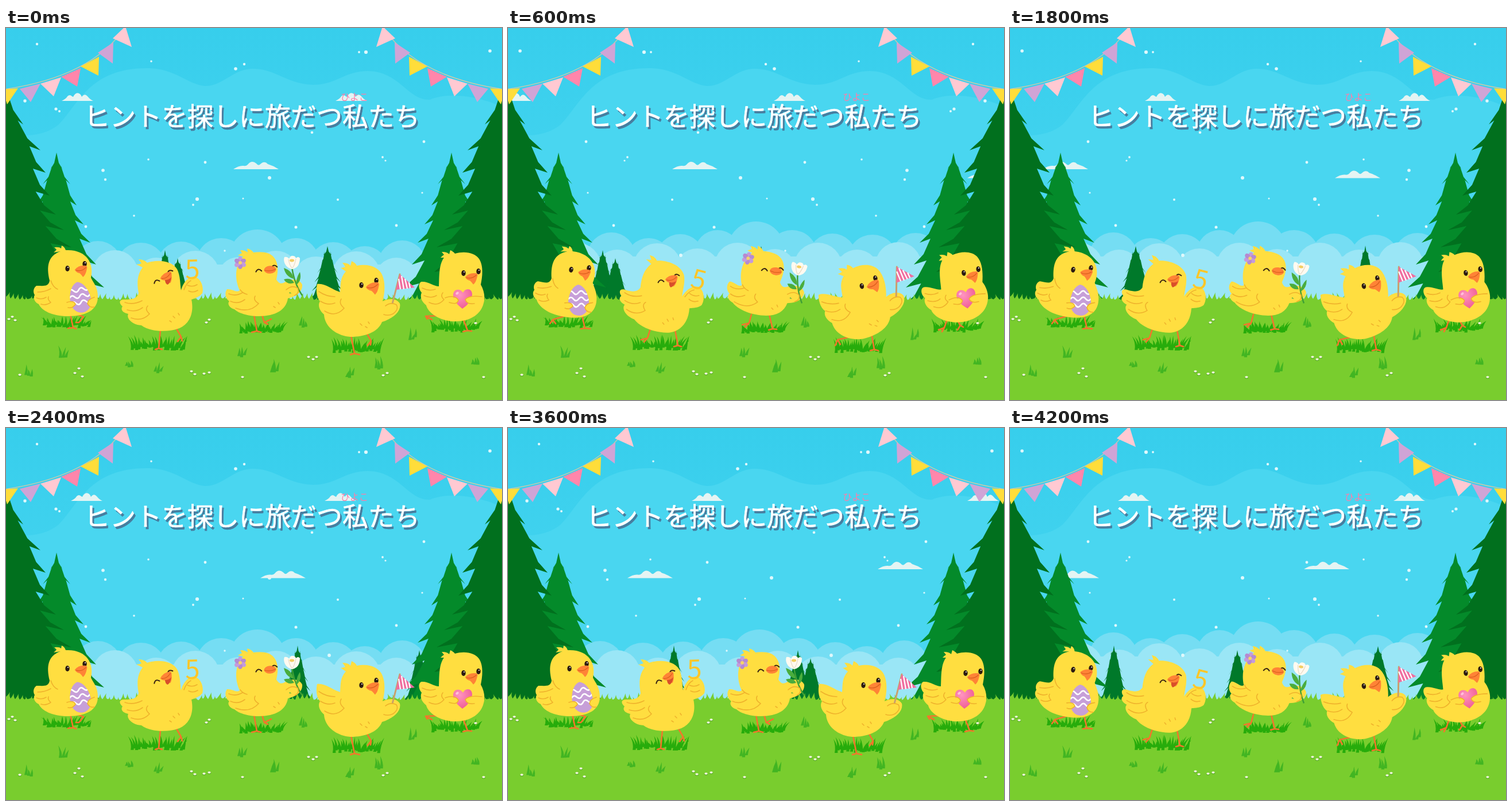
Animation, 864 px wide and 648 px high, one loop 4800 ms. Source, as an HTML page:

```html
<!DOCTYPE html>
<html lang="ja">
<head>
<meta charset="utf-8">
<title>ヒントを探しに旅だつ私たち</title>
<style>
html, body { margin: 0; width: 100%; height: 100%; overflow: hidden; background: #45d4ef; }
svg { display: block; width: 100vw; height: 100vh; }
text { font-family: "Noto Sans CJK JP", "Noto Sans CJK", sans-serif; }
.line { fill: none; stroke: #efb22c; stroke-width: 1.6; stroke-linecap: round; stroke-linejoin: round; }
.leg { fill: none; stroke: #f4752b; stroke-width: 2.6; stroke-linecap: round; stroke-linejoin: round; }
.smile { fill: none; stroke: #3a2412; stroke-width: 2; stroke-linecap: round; }
</style>
</head>
<body>
<svg id="stage" viewBox="0 0 864 648" preserveAspectRatio="none"></svg>
<script>
const STEP = 600, STEPS = 8;
const stage = document.getElementById('stage');

let seed = 7;
const rand = () => (seed = (seed * 16807) % 2147483647) / 2147483647;
const path = (d, fill, more = '') => `<path d="${d}" fill="${fill}" ${more}/>`;
const stroke = (d, cls) => `<path d="${d}" class="${cls}"/>`;
const oval = (x, y, rx, ry, fill, rot = 0) =>
  `<ellipse cx="${x}" cy="${y}" rx="${rx}" ry="${ry}" fill="${fill}" transform="rotate(${rot} ${x} ${y})"/>`;
const dot = (x, y, r, fill) => oval(x, y, r, r, fill);
const mirrored = s => s + `<g transform="matrix(-1 0 0 1 864 0)">${s}</g>`;

// Fir silhouette from the reach of each branch tip, [dx, y].
function fir(cx, top, tips, fill) {
  const side = s => {
    const pts = [];
    tips.forEach(([dx, y], i) => {
      const px = i ? tips[i - 1][0] * .68 : 0, py = i ? tips[i - 1][1] - 7 : top;
      const mx = px * .55 + dx * .45, my = py * .4 + y * .6;
      pts.push([cx + s * px, py], [cx + s * (mx - 1), my], [cx + s * dx, y]);
    });
    return pts;
  };
  return path('M' + [...side(1), ...side(-1).reverse()].map(p => p.join()).join('L') + 'Z', fill);
}

function smallFir(x, top, half) {
  const h = 474 - top, tips = [];
  for (let i = 1; i <= 6; i++) tips.push([half * Math.pow(i / 6, .85), top + h * i / 6]);
  return fir(x, top, tips, '#00792a');
}

function tuft(x, y, n, w, h, fill) {
  let d = '';
  for (let i = 0; i < n; i++) {
    const u = n > 1 ? i / (n - 1) * 2 - 1 : 0;
    const bx = x + u * w * .42, tx = x + u * w * .5 + (rand() - .3) * 9;
    const ty = y - h * (.45 + rand() * .55), by = y + (rand() - .5) * h * .3;
    d += `M${bx - 2.4},${by}Q${bx},${(by + ty) / 2} ${tx},${ty}Q${bx + 4},${(by + ty) / 2} ${bx + 3},${by}Z`;
  }
  return path(d, fill);
}

function bumps(list, fill) {
  return list.map(([x, y, r]) => dot(x, y + r, r, fill)).join('') +
    `<rect x="0" y="412" width="864" height="90" fill="${fill}"/>`;
}

function bunting() {
  const pink = '#ffc9d2', mauve = '#d0a4d6', gold = '#ffdd3a', rose = '#ff86ab';
  const flags = [
    ['208,-3 186,18 219,33', pink], ['187,25 160,43 186,62', mauve],
    ['162,50 130,67 161,83', gold], ['130,70 96,85 124,102', rose],
    ['96,86 60,97 83,119', pink], ['60,97 24,106 43,129', mauve], ['21,105 -6,107 2,133', gold]];
  return '<path d="M208,-2Q150,85 -4,107" fill="none" stroke="#d9c9a5" stroke-width="1.2"/>' +
    flags.map(([p, c]) => `<polygon points="${p}" fill="${c}"/>`).join('');
}

function ground() {
  let d = 'M0,648L0,468';
  for (let x = 0; x < 864; x += 8) {
    const top = 460 + rand() * 9, lean = (rand() - .5) * 7;
    d += `Q${x + 3},${top + 6} ${x + 4 + lean},${top}Q${x + 5},${top + 7} ${x + 8},${470 + rand() * 4}`;
  }
  let s = path(d + 'L864,648Z', '#79cd2e');
  for (const [x, y, w, h] of [[105, 523, 92, 20], [264, 562, 106, 25], [444, 533, 84, 22], [610, 566, 92, 25], [782, 530, 92, 23]])
    s += tuft(x, y - 3, 24, w, h, '#27ac0b');
  for (const [x, y] of [[39, 605], [99, 573], [214, 591], [264, 600], [410, 571], [467, 597], [598, 608], [649, 592], [708, 541], [817, 587], [517, 521]])
    s += tuft(x, y, 3, 11, 21, '#42b522');
  for (const [x, y] of [[5, 507], [11, 503], [16, 509], [24, 604], [127, 593], [120, 601], [133, 607], [323, 598], [329, 603], [345, 602], [354, 600], [354, 508], [349, 513], [412, 608], [527, 573], [535, 577], [541, 573], [657, 605], [664, 601], [832, 608], [818, 514]])
    s += oval(x, y + 1, 3.2, 1.8, '#58a72b') + oval(x, y, 2.7, 1.7, '#f3f7df');
  return s;
}

const eye = (x, y) => oval(x, y, 3.7, 5, '#2c1b10') + dot(x + 1, y - 2, 1, '#fff');
const happy = (x, y, rot) => `<g transform="translate(${x} ${y}) rotate(${rot})">${stroke('M-5,2Q0,-5 5,2', 'smile')}</g>`;
const beak = (x, y, rot, k = 1) => `<g transform="translate(${x} ${y}) rotate(${rot}) scale(${k})">` +
  path('M-11,-3Q-3,-11 9,-8Q12,-6 10,-2Q7,8 2,11Q-1,6 -3,4Q-9,2 -11,-3Z', '#ff8336') +
  path('M-9,-2Q0,2 9,-5', 'none', 'stroke="#d95f1d" stroke-width="1.2"') + '</g>';

function egg() {
  const waves = [-13, -2, 9].map(y =>
    `<path d="M-18,${y}q4.5,-6 9,0t9,0t9,0t9,0" fill="none" stroke="#fff" stroke-width="2.6" clip-path="url(#shell)"/>`).join('');
  return '<g transform="translate(129 469) rotate(-11)">' +
    path('M0,-27C13,-24 19,-4 18,8C17,20 9,27 0,27C-9,27 -17,20 -18,8C-19,-4 -13,-24 0,-27Z', '#c79fd8') + waves + '</g>';
}

function blossom() {
  let s = '';
  for (let i = 0; i < 6; i++) s += oval(408, 403, 4, 5, i % 2 ? '#b58ad0' : '#c49bdc').replace('rotate(0 408 403)', `rotate(${i * 60} 408 409)`);
  return s + dot(408, 409, 3, '#f5d36a');
}

const bouquet = path('M498,417Q502,445 516,466', 'none', 'stroke="#3f9f35" stroke-width="2.4"') +
  path('M501,437Q487,433 484,418Q499,423 501,437ZM505,448Q506,433 512,425Q516,440 505,448ZM502,444Q490,448 484,438Q497,434 502,444ZM508,452Q498,454 493,462Q506,464 508,452Z', '#4aad3d') +
  path('M498,420C487,418 482,406 485,399Q490,398 493,402Q496,396 500,397Q504,397 505,401Q509,397 512,401C512,412 507,419 498,420Z', '#fffaf0') +
  path('M492,403Q494,414 498,418M505,402Q503,413 499,418', 'none', 'stroke="#e6d9c6" stroke-width="1.2"') +
  oval(498, 405, 4, 2.4, '#f3cf62');

const flag = path('M671,488L686,429', 'none', 'stroke="#c9a06c" stroke-width="3" stroke-linecap="round"') +
  path('M686,429L712,452L679,456Z', '#ef6fa0') +
  path('M689,432L693,455M695,437L699,454M702,443L704,453M684,437L687,455', 'none', 'stroke="#fff" stroke-width="2.2"');

const heart = path('M795,489C786,482 778,474 779,464C780,454 791,453 796,461C800,452 812,453 812,464C812,474 804,483 795,489Z', 'url(#rosy)') +
  oval(786, 462, 3, 2, '#ffc0d9', -35);

// turn: [angle, cx, cy, dx, dy] of the second pose
const chicks = [
  { turn: [10, 129, 469, -6, 5],
    legs: ['M112,499L117,522L108,523M117,522L122,524M124,499L135,503L127,513L122,513', 'M98,502L78,508L73,515M78,508L83,515M129,501L134,523L127,524M134,523L143,524'],
    body: 'M95,389L83,391Q87,388 88,386L84,382Q93,381 96,384L97,379Q102,381 104,387C140,385 154,410 148,435C153,445 160,452 160,468C160,491 140,502 108,502C80,502 62,492 57,481C52,479 46,472 50,465C45,457 51,449 54,449C66,449 74,451 76,440C70,415 73,397 95,389Z',
    front: egg() + path('M106,478Q118,474 121,481Q116,489 108,487ZM154,469Q143,472 142,480Q146,488 154,486Z', '#ffde40') +
      stroke('M55,460Q68,460 78,454M53,470Q62,474 70,469M61,481Q69,484 78,478Q72,473 74,468M106,478Q118,474 121,481Q116,489 108,487M154,469Q143,472 142,480Q146,488 154,486M78,440Q82,452 90,455', 'line') +
      eye(107, 419) + eye(137, 411) + beak(131, 423, -6) },
  { turn: [16, 270, 475, -5.5, .5],
    legs: ['M269,526L266,558L260,560M266,558L272,560M297,524L305,538L299,546M305,538L307,545', 'M248,524L243,540L232,543M243,540L237,547M291,526L296,553L289,555M296,553L302,555'],
    body: 'M238,417L227,412Q234,411 236,410L231,403Q241,403 246,409C260,404 287,403 298,420C304,432 303,445 305,457C308,444 318,432 328,433C340,436 345,452 342,462C338,468 329,471 323,473C328,496 320,515 302,523C280,531 250,529 236,518C220,517 209,506 213,498C203,496 199,490 203,485C195,478 198,472 208,473C220,473 228,471 231,462C228,445 228,430 238,417Z',
    front: `<text x="312" y="437" font-size="46" font-weight="400" fill="#ffc628" transform="rotate(-2 325 420)">5</text>` +
      path('M310,456Q314,444 322,440Q334,437 339,448Q341,460 330,464Z', '#ffde40') +
      stroke('M207,478Q222,483 237,475M211,491Q226,496 238,487M218,505Q237,512 250,498Q241,490 247,484M316,448Q325,452 333,447M318,458Q326,462 334,457M310,456Q314,444 322,440M291,502l3,3M285,510l3,2M300,497l2,3', 'line') +
      happy(262, 441, -25) + happy(285, 424, -30) + beak(280, 435, -22) + path('M277,439Q284,439 288,434Q286,446 281,447Q277,444 277,439Z', '#d84f2a') },
  { turn: [12, 440, 450, 1, -2],
    legs: ['M432,500L437,528L428,530M437,528L444,530M446,500L450,513L462,507M450,513L456,516', 'M424,499L420,514L408,517M420,514L413,521M455,499L461,524L454,526M461,524L468,525'],
    body: 'M413,398L404,396Q409,393 411,392L408,387Q417,387 421,391L420,384Q428,386 431,391C448,389 460,391 467,400C475,410 474,425 471,438C476,447 482,446 488,441C500,436 512,438 516,447C517,460 505,468 491,471C488,491 470,502 440,502C420,502 404,496 398,490C389,488 385,480 389,476C381,470 381,460 385,455C394,454 402,462 407,457C399,440 397,415 413,398Z',
    front: blossom() + bouquet + path('M488,456Q498,447 508,453Q512,461 503,466Z', '#ffde40') +
      stroke('M388,463Q400,468 412,461M391,476Q404,482 416,473M400,488Q425,497 440,480Q430,474 434,467M488,456Q498,447 508,453Q512,461 503,466M408,456Q412,462 420,464M474,478l2,3M466,485l3,2', 'line') +
      happy(440, 422, -8) + happy(467, 415, -8) + oval(460, 421, 10.5, 6.8, '#ff8336', -4) + path('M450,422Q460,425 470,420', 'none', 'stroke="#d95f1d" stroke-width="1.2"') },
  { turn: [-13, 600, 480, 5, 5],
    legs: ['M601,536L607,567L600,569M607,567L616,569M629,533L636,545L630,553M636,545L635,552', 'M592,539L574,543L570,553M574,543L579,551M634,537L638,560L631,562M638,560L645,562'],
    body: 'M592,424L583,418Q589,417 591,416L586,409Q596,409 600,414L602,406Q609,409 611,414C630,410 645,415 653,426C662,440 660,462 656,476C665,471 680,470 686,480C689,493 675,506 655,512C648,530 625,538 600,538C575,536 555,520 554,499C545,491 543,482 547,476C540,468 540,455 542,446C556,444 568,456 582,460C583,445 582,435 592,424Z',
    front: flag + path('M661,484Q670,477 680,482Q685,490 674,498Z', '#ffde40') +
      stroke('M545,459Q558,468 573,468M548,476Q560,484 573,479M555,493Q574,505 589,488Q579,480 584,472M661,484Q670,477 680,482Q685,490 674,498M658,499Q666,502 674,498M617,515l3,3M626,520l3,2M631,512l2,3', 'line') +
      eye(619, 448) + eye(645, 440) + beak(639, 453, -8, 1.08) },
  { turn: [-8, 785, 470, 3, 1],
    legs: ['M757,501L731,502L742,508M731,502L734,507M797,508L804,527L796,529M804,527L811,528', 'M765,508L760,522L750,526M760,522L756,529M782,508L788,518L783,526M788,518L793,521'],
    body: 'M763,400L757,400Q761,396 763,395L759,390Q768,390 772,394L774,387Q780,390 782,393C800,388 817,392 824,402C832,414 830,432 827,447C833,457 835,470 832,479C827,501 805,512 780,511C755,510 735,496 732,483C723,476 721,467 724,461C717,453 719,443 724,442C735,441 745,450 754,450C755,438 753,413 763,400Z',
    front: heart + path('M775,472Q786,466 788,474Q786,483 777,481ZM829,466Q806,466 800,473Q803,482 813,481Z', '#ffde40') +
      stroke('M725,453Q737,459 748,455M728,466Q741,472 750,466M737,478Q752,486 763,473Q756,467 761,461M765,470Q782,464 788,474Q786,483 772,478M829,468Q806,465 800,473Q803,482 816,480', 'line') +
      eye(797, 427) + eye(823, 424) + beak(811, 436, -5) }
];

const starList = [[54, 28, 2.2], [253, 58, 1.8], [400, 71, 2.8], [415, 63, 2.2], [615, 42, 1.9], [627, 42, 3.1], [843, 40, 2.8], [33, 127, 2.7], [87, 141, 2.6], [93, 145, 2], [169, 248, 2.8], [173, 264, 2.2], [248, 229, 1.8], [347, 234, 2.4], [333, 298, 3.1], [326, 308, 1.9], [223, 327, 1.8], [459, 261, 3], [413, 297, 1.5], [533, 182, 2.3], [656, 225, 1.9], [661, 231, 1.6], [578, 299, 2], [728, 198, 2.4], [725, 287, 1.6], [505, 347, 2.5], [680, 344, 2.4], [139, 346, 2.4], [381, 388, 1.7], [563, 396, 2.9]];

const puff = path('M0,14Q8,10 10,6Q14,2 18,6L20,7Q25,-3 32,2Q34,4 35,7Q40,0 45,6Q50,12 55,14Z', '#e4f4f3');
const drift = path('M0,14Q10,7 18,8Q22,9 25,6Q32,-3 40,4Q43,8 46,6Q54,-2 60,5Q70,8 79,14Z', '#e4f4f3');

// Left edge or tip of each passing thing, step by step.
const movers = [
  { y: 113, art: puff, xs: [574, 463, 365, 235, 113, -12, 800, 668] },
  { y: 113, art: puff, xs: [97, -14, 808, 677, 555, 432, 320, 188] },
  { y: 232, art: drift, xs: [396, 286, 188, 57, -90, 756, 644, 512] },
  { y: 247.5, art: drift, xs: [-90, 800, 697, 566, 443, 320, 208, 76] },
  { y: 0, art: smallFir(0, 380, 32), xs: [560, 441, 327, 219, 111, 857, 749, 641] },
  { y: 0, art: smallFir(0, 387, 27) + smallFir(22, 401, 26), xs: [277, 165, 50, 828, 720, 612, 505, 396] },
  { y: 0, art: smallFir(0, 379, 26), xs: [70, 838, 727, 619, 508, 397, 289, 181] }
];

const bigFirs = fir(88, 217, [[11, 247], [24, 272], [35, 309], [47, 342], [59, 374], [69, 412], [83, 452], [84, 480]], '#048a2a') +
  fir(0, 105, [[30, 168], [60, 213], [69, 252], [76, 292], [87, 325], [101, 352], [114, 382], [118, 425], [122, 480]], '#01701e');

const title = (dx, dy, fill) => `<text x="${136 + dx}" y="${171 + dy}" font-size="45" font-weight="500" fill="${fill}" stroke="${fill}" stroke-width=".7" stroke-linejoin="round">ヒントを探しに旅だつ私たち</text>`;

stage.innerHTML = `
<defs>
  <linearGradient id="sky" x2="0" y2="1"><stop offset="0" stop-color="#37ceec"/><stop offset=".4" stop-color="#42d3ef"/></linearGradient>
  <radialGradient id="rosy" cx=".35" cy=".3" r=".8"><stop offset="0" stop-color="#ff94bf"/><stop offset="1" stop-color="#ee5791"/></radialGradient>
  <clipPath id="shell"><path d="M0,-27C13,-24 19,-4 18,8C17,20 9,27 0,27C-9,27 -17,20 -18,8C-19,-4 -13,-24 0,-27Z"/></clipPath>
</defs>
<rect width="864" height="648" fill="url(#sky)"/>
${path('M0,182C30,190 65,190 92,168C125,135 145,70 245,70C295,70 315,98 346,101C378,102 395,71 430,71C470,71 490,98 535,99C575,99 590,75 630,75C685,75 700,126 738,125C770,110 830,120 864,138V480H0Z', '#49d6f0')}
<g id="haze">${bumps([[90, 374, 45], [160, 371, 42], [235, 374, 44], [305, 372, 42], [375, 366, 44], [438, 351, 50], [505, 366, 40], [570, 373, 42], [625, 380, 40], [690, 370, 42], [770, 374, 45]], '#75ddf3')}
${bumps([[110, 390, 42], [190, 387, 40], [262, 400, 38], [330, 388, 42], [405, 399, 36], [470, 388, 40], [540, 398, 40], [610, 389, 42], [680, 400, 38], [750, 388, 42]], '#9ae6f6')}</g>
<g id="stars">${starList.map(([x, y, r]) => dot(x, y, r, '#dff8fc')).join('')}</g>
${movers.map(m => `<g class="mover">${m.art}</g>`).join('')}
${mirrored(bigFirs)}
${mirrored(bunting())}
${ground()}
${chicks.map(c => `<path class="leg"/><g class="chick">${path(c.body, '#ffde40')}${c.front}</g>`).join('')}
${title(3, 3.5, '#477d9f')}${title(0, 0, '#fff')}
<text x="583" y="126" font-size="16" font-weight="400" fill="#ff7da8">ひよこ</text>`;

const all = sel => [...stage.querySelectorAll(sel)];
const moverEls = all('.mover'), legEls = all('.leg').slice(-chicks.length), chickEls = all('.chick');
const haze = stage.querySelector('#haze'), stars = stage.querySelector('#stars');

function show(step) {
  const odd = step % 2;
  movers.forEach((m, i) => moverEls[i].setAttribute('transform', `translate(${m.xs[step]} ${m.y})`));
  stars.setAttribute('transform', odd ? 'matrix(-1 0 0 1 864 0)' : '');
  haze.setAttribute('transform', odd ? 'matrix(-1 0 0 1 870 -14)' : '');
  chicks.forEach((c, i) => {
    const [a, cx, cy, dx, dy] = c.turn;
    legEls[i].setAttribute('d', c.legs[odd]);
    chickEls[i].setAttribute('transform', odd ? `translate(${dx} ${dy}) rotate(${a} ${cx} ${cy})` : '');
  });
}

const start = performance.now();
function tick() {
  show(Math.floor((performance.now() - start) / STEP) % STEPS);
  requestAnimationFrame(tick);
}
tick();
</script>
</body>
</html>
```
